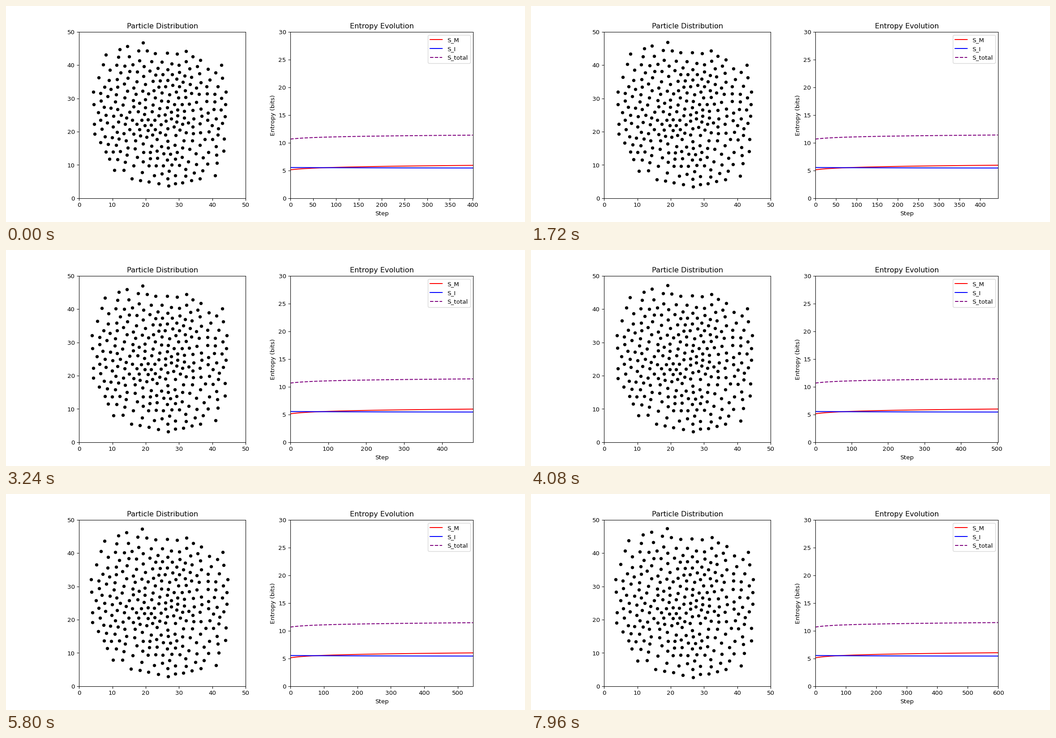
A matplotlib script that plays this animation: 1159x483 px, repeating every 8 s.

```python
import numpy as np
import matplotlib.pyplot as plt
from matplotlib.animation import FuncAnimation
from matplotlib.path import Path

FRAMES, INTERVAL = 200, 40
FIRST_STEP = 401
PARTICLES = 275
BOX = 50
CENTER = np.array([24.3, 25.0])

# Corners of the cloud; each one is a particle too.
HULL = np.array([
    (19.2, 46.8), (14.5, 45.7), (8.1, 43.2), (5.9, 36.3), (4.3, 32.0),
    (4.7, 19.4), (8.1, 14.0), (10.6, 8.4), (15.9, 5.9), (26.8, 3.7),
    (31.1, 4.7), (40.8, 6.9), (43.4, 14.2), (44.1, 32.0), (42.7, 40.0),
    (36.4, 41.5), (32.1, 44.2), (22.9, 43.6),
])


def radius(p):
    return np.hypot(*(p - CENTER).T)[:, None]


def spacing(p):
    """Relative gap between neighbours, wider away from the centre."""
    return 1 + 0.35 * (radius(p)[:, 0] / 21) ** 2


def scatter_inside(hull, count, rng):
    """Best-candidate sampling, then a gentle mutual repulsion."""
    region = Path(hull)
    pts = hull
    while len(pts) < count:
        cand = rng.uniform(3, 47, (220, 2))
        cand = cand[region.contains_points(cand)]
        gap = np.linalg.norm(cand[:, None] - pts, axis=2).min(axis=1)
        pts = np.vstack([pts, cand[np.argmax(gap / spacing(cand))]])
    fixed, free = pts[:len(hull)], pts[len(hull):]
    for _ in range(12):
        diff = free[:, None] - np.vstack([fixed, free])
        dist = np.linalg.norm(diff, axis=2) + 1e-9
        push = np.clip(1 - dist / (2 * spacing(free)[:, None]), 0, None)
        moved = free + 0.12 * (diff * (push / dist)[..., None]).sum(axis=1)
        free = np.where(region.contains_points(moved)[:, None], moved, free)
    return np.vstack([fixed, free])


def outward(p, rng):
    """Displacement of each particle over one loop."""
    r = radius(p)
    size = 0.85 * np.minimum(r / 21, 1) ** 2
    return (p - CENTER) / r * size + rng.normal((-0.1, -0.05), 0.08, p.shape)


fig, (ax, ax_s) = plt.subplots(1, 2, figsize=(12, 5), dpi=96.61)

# Particles
rng = np.random.default_rng(7)
start = scatter_inside(HULL, PARTICLES, rng)
drift = outward(start, rng)
ax.set(xlim=(0, BOX), ylim=(0, BOX), aspect="equal",
       title="Particle Distribution")
dots, = ax.plot([], [], "ko", markersize=4.5)

# Entropy curves
steps = np.arange(FIRST_STEP + FRAMES)
s_m = 5.13 + 0.3 * np.log1p(steps / 30)
s_i = 5.54 - 0.11 * (1 - np.exp(-steps / 250))
curves = [
    (s_m, ax_s.plot([], [], "r-", label="S_M")[0]),
    (s_i, ax_s.plot([], [], "b-", label="S_I")[0]),
    (s_m + s_i, ax_s.plot([], [], "--", color="purple", label="S_total")[0]),
]
ax_s.set(ylim=(0, 30), title="Entropy Evolution",
         xlabel="Step", ylabel="Entropy (bits)")
ax_s.legend(loc="upper right")


def update(i):
    t = (i / (FRAMES - 1)) ** 0.9
    dots.set_data(*(start + drift * t).T)
    n = FIRST_STEP + i
    for data, line in curves:
        line.set_data(steps[:n], data[:n])
    ax_s.set_xlim(0, n)
    return [dots] + [line for _, line in curves]


anim = FuncAnimation(fig, update, frames=FRAMES, interval=INTERVAL,
                     repeat=True, repeat_delay=0, blit=False)
plt.show()
```
